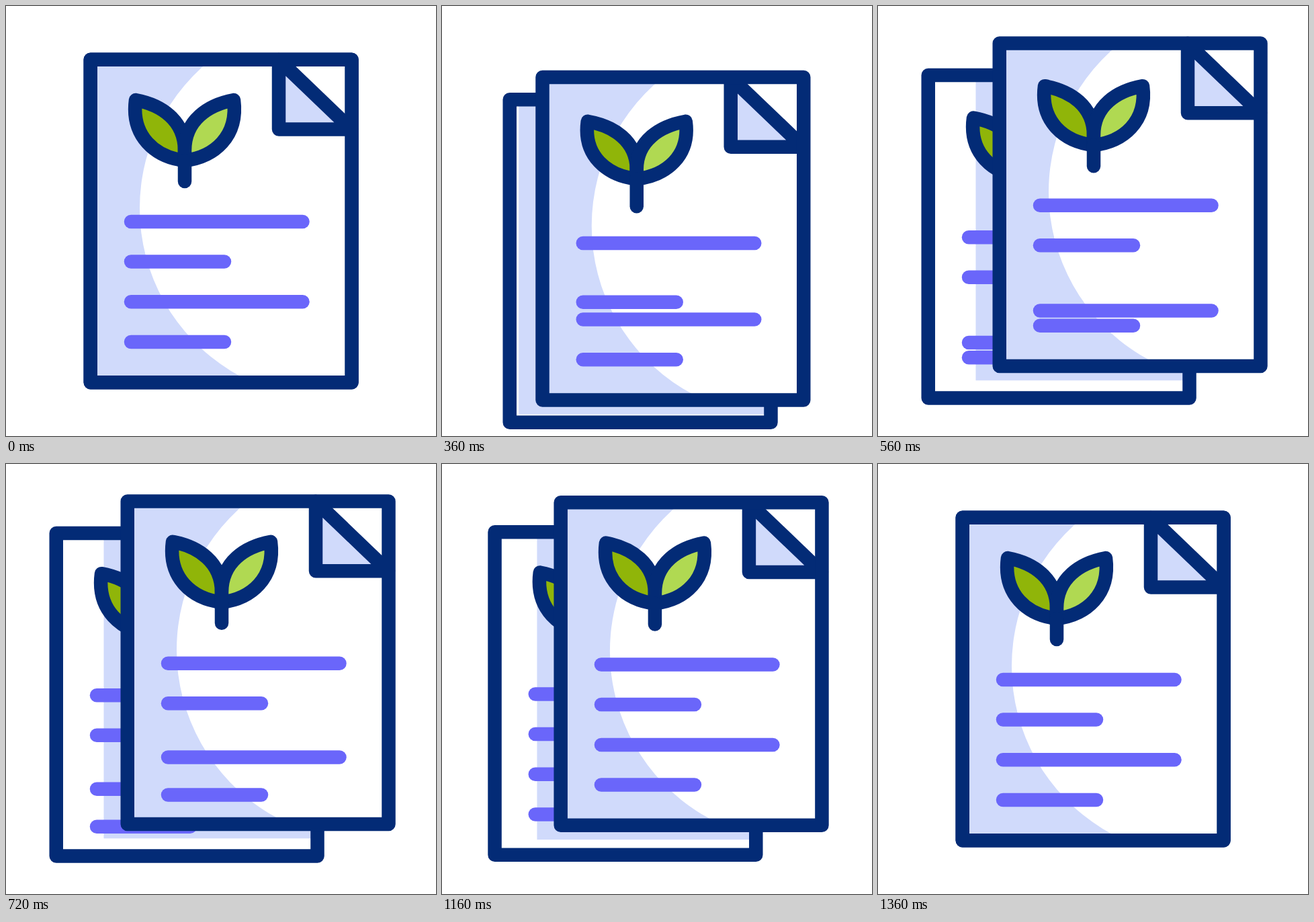
An HTML page that plays this animation: 640x640 px, repeating every 1.48 s.

```html
<!DOCTYPE html>
<html lang="en">
<head>
<meta charset="utf-8">
<title>Leaf documents</title>
<style>
  html, body { margin: 0; width: 100%; height: 100%; overflow: hidden; background: #fff; }
  svg { display: block; width: 100vw; height: 100vh; }
  .edge { stroke: #032b76; }
  .row { stroke: #6a66fa; }
  .tint { fill: #d0dafb; }
  .dark { fill: #90b509; }
  .light { fill: #b0d952; }
  .edge, .row { stroke-width: 20.5; stroke-linecap: round; stroke-linejoin: round; }
  .line { fill: none; }
</style>
</head>
<body>
<svg viewBox="0 0 640 640">
  <defs>
    <clipPath id="sheet"><rect id="sheetBox" x="126" y="80" width="388" height="480"/></clipPath>
    <g id="content">
      <path id="leftLeaf" class="edge dark"/>
      <path id="rightLeaf" class="edge light"/>
      <path id="stem" class="edge line"/>
      <g id="rows"></g>
    </g>
    <rect id="frame" x="125.75" y="79.75" width="388.75" height="480.5"/>
  </defs>
  <g id="back">
    <use href="#frame" fill="#fff"/>
  </g>
  <g clip-path="url(#sheet)">
    <rect id="shade" class="tint" x="90.5" y="40" width="500" height="541.5"/>
  </g>
  <g id="backTop">
    <use href="#content"/>
    <use href="#frame" class="edge line"/>
  </g>
  <g id="front">
    <use href="#frame" fill="#fff"/>
    <path class="tint" d="M126 80H304.8A283.7 283.7 0 0 0 366.9 560H126Z"/>
    <use href="#content"/>
    <path class="tint" d="M406 80V183.5H514Z"/>
    <path class="edge line" d="M406 80V183.5H514Z"/>
    <use href="#frame" class="edge line"/>
  </g>
</svg>
<script>
const LOOP = 1480, STEP = 40;
const $ = id => document.getElementById(id);
const smooth = u => u * u * (3 - 2 * u);
const ease = (t, a, b) => smooth(Math.min(1, Math.max(0, (t - a) / (b - a))));

// Eased value through [time, value] keys
function track(t, keys) {
  let v = keys[0][1];
  for (let i = 1; i < keys.length; i++) {
    v += (keys[i][1] - keys[i - 1][1]) * ease(t, keys[i - 1][0], keys[i][0]);
  }
  return v;
}

// Dip first, spread apart, then gather again
function slide(t, dip, end, lift) {
  const p = ease(t, 100, 340), q = ease(t, 340, 510), home = 1 - ease(t, 1120, 1360);
  const x = dip[0] * p ** 1.6 + (end[0] - dip[0]) * q;
  const y = dip[1] * p ** lift + (end[1] - dip[1]) * q;
  return [x * home, y * home];
}

const rows = [
  { y: 321, end: 441.5, hop: [95, 245, 395], amp: 42 },
  { y: 380.5, end: 325, hop: [252, 402, 552], amp: 42 },
  { y: 440.3, end: 441.5, hop: [405, 600, 835], amp: 42 },
  { y: 500, end: 325, hop: [608, 844, 1080], amp: 36 }
];
for (const r of rows) {
  r.el = document.createElementNS("http://www.w3.org/2000/svg", "path");
  r.el.setAttribute("class", "row line");
  $("rows").append(r.el);
}

function drawPlant(t) {
  const tip = track(t, [[100, 0], [220, -12], [440, 13], [620, 0]]);
  const base = track(t, [[320, 0], [450, 4.5], [620, 0]]);
  const root = track(t, [[100, 0], [230, 14.5], [640, 0]]);
  const k = (90 + base - tip) / 90;
  const leaf = side => {
    const pt = (x, y) => `${266 + side * x} ${230 + base - y * k} `;
    return "M" + pt(0, 0) + "C" + pt(44, 5) + pt(80, 36) + pt(73, 90) +
      "C" + pt(35, 83) + pt(0, 60) + pt(0, 15) + "Z";
  };
  $("leftLeaf").setAttribute("d", leaf(-1));
  $("rightLeaf").setAttribute("d", leaf(1));
  $("stem").setAttribute("d", `M266 ${230 + base}V${261 + root}`);
}

function draw(t) {
  const move = (id, [x, y]) => $(id).setAttribute("transform", `translate(${x} ${y})`);
  const front = slide(t, [22.5, 28.3], [55, -24.2], 0.8);
  const back = slide(t, [-24, 61], [-51, 23.2], 1);
  move("front", front);
  move("shade", front);
  move("back", back);
  move("backTop", back);
  move("sheetBox", back);
  drawPlant(t);
  for (const { y, end, hop, amp, el } of rows) {
    const dy = track(t, [[hop[0], 0], [hop[1], amp], [hop[2], 0]]);
    el.setAttribute("d", `M186 ${y + dy}H${end}`);
  }
}

function tick(now) {
  draw(Math.floor((now % LOOP) / STEP) * STEP);
  requestAnimationFrame(tick);
}
draw(0);
requestAnimationFrame(tick);
</script>
</body>
</html>
```
